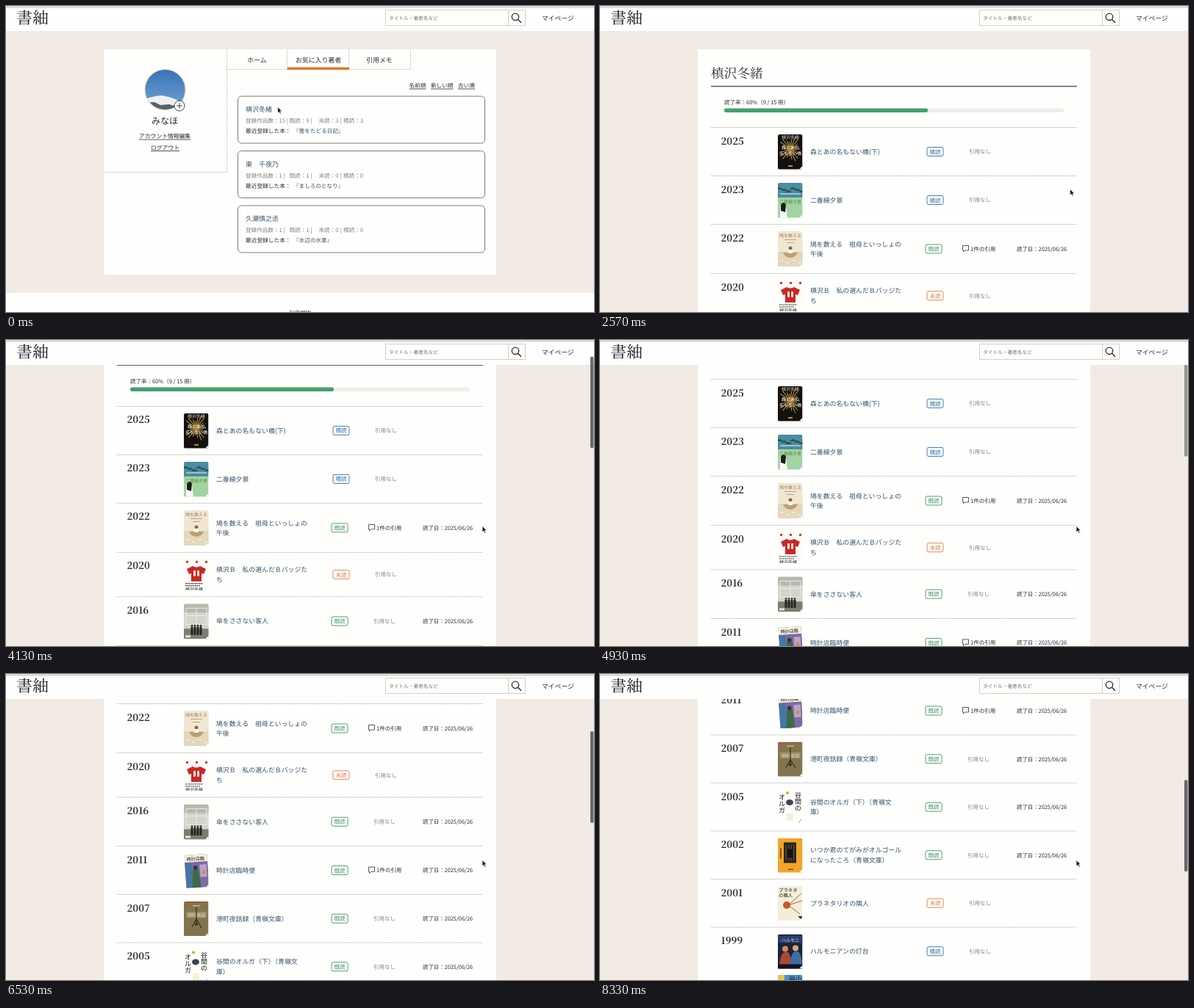
An HTML page for the animation above (8.36 s loop, 800 by 417 pixels).

```html
<!DOCTYPE html>
<html lang="ja">
<head>
<meta charset="utf-8">
<title>読書記録</title>
<style>
  html, body { margin: 0; width: 100%; height: 100%; overflow: hidden; background: #f1ebe3; }
  svg { display: block; width: 100vw; height: 100vh; }
  text { font-family: 'Noto Sans CJK JP', 'Noto Sans CJK', 'Noto Sans', sans-serif; text-rendering: geometricPrecision; white-space: pre; }
  .serif { font-family: 'Noto Serif CJK JP', 'Noto Serif', 'Noto Sans CJK JP', serif; }
  .bold { font-weight: 500; }
  .heavy { font-weight: 600; }
  .mid { text-anchor: middle; }
</style>
</head>
<body>
<svg id="stage" viewBox="0 0 800 417"></svg>
<script>
const LOOP = 8360, PAGE_SWITCH = 1240;
const BACKDROP = '#f1ebe3', PAPER = '#fefefd', INK = '#2c2c2e', SLATE = '#34556a', MUTED = '#84827f', BORDER = '#d8cfc2';
const AUTHOR = '槙沢冬緒';

const text = (x, y, size, str, fill = INK, cls = '') =>
  `<text x="${x}" y="${y}" font-size="${size}" fill="${fill}" class="${cls}">${str}</text>`;
const rect = (x, y, w, h, fill, more = '') =>
  `<rect x="${x}" y="${y}" width="${w}" height="${h}" fill="${fill}" ${more}/>`;
const path = (d, stroke, width = 1, more = 'fill="none"') =>
  `<path d="${d}" stroke="${stroke}" stroke-width="${width}" ${more}/>`;
const shape = (d, fill) => `<path d="${d}" fill="${fill}"/>`;
const ball = (x, y, r, fill, more = '') => `<circle cx="${x}" cy="${y}" r="${r}" fill="${fill}" ${more}/>`;
const range = (n, fn) => Array.from({ length: n }, (_, i) => fn(i)).join('');
const link = (x, y, w, size, str) => text(x, y, size, str) + path(`M${x} ${y + 2}h${w}`, INK, .8);

// Book covers, drawn in a 34 x 48 box
const figures = (y, n, colour) => range(n, i =>
  ball(11 + i * 4, y, 1.3, colour) + rect(9.5 + i * 4, y + 1.5, 3, 11, colour));
const column = (x, y, size, str, fill = '#151515') =>
  [...str].map((c, i) => text(x, y + i * size, size, c, fill, 'bold')).join('');

const covers = {
  burst: () => rect(0, 0, 34, 48, '#12110f') +
    range(22, i => {
      const a = i * Math.PI / 11, r = 13 + 4 * Math.sin(i * 5);
      return path(`M17 20L${17 + r * Math.cos(a)} ${20 + r * 1.1 * Math.sin(a)}`, '#b08a3e', 1.1);
    }) +
    text(17, 6, 6, AUTHOR, '#dcd6c8', 'mid') + text(17, 20, 6, '森とあの', '#ffffff', 'mid bold') +
    text(17, 28, 6, '名もない橋', '#ffffff', 'mid bold') + rect(14, 42, 6, 2, '#b08a3e'),
  garden: () => rect(0, 0, 34, 48, '#a3d3a0') + rect(0, 0, 34, 20, '#4a8ca0') +
    range(6, i => shape(`M${i * 6 - 2} ${9 + i % 3 * 2}q5 -6 9 0z`, '#2b5358')) +
    rect(3, 14, 28, 2, '#9bc4c4') + text(17, 28, 6, '二番線夕景', '#5b8a4c', 'mid') +
    shape('M3 48V32Q6 25 11 31L13 48z', '#fbfaf6') + shape('M4 38V30Q8 24 11 30L10 40z', '#1b1d1c'),
  boat: () => rect(0, 0, 34, 48, '#efe7d2') + rect(0, 28, 34, 20, '#e3d7bc') +
    text(17, 8, 6, '鳩を数える', '#a1835a', 'mid') + rect(9, 11, 16, 1, '#bba37c') + rect(12, 15, 10, 1, '#bba37c') +
    shape('M7 29h20q-3 7-10 7t-10-7z', '#bf9f6c') + ball(17, 23, 2.5, '#8a6747') + rect(14, 25, 6, 5, '#faf6ea') +
    range(4, i => path(`M${3 + i * 8} ${40 + i % 2 * 3}h5`, '#faf6ea')),
  shirt: () => rect(0, 0, 34, 48, '#fdfcfa') +
    range(3, i => rect(3 + i * 13, 2, 3, 3, '#d23a30')) +
    shape('M12 9q5 3 10 0l8 4-3 7-3-1v11H10V19l-3 1-3-7z', '#c62a28') +
    rect(13, 15, 3, 8, '#f6dcd0', 'rx="1"') + rect(18, 15, 3, 8, '#f6dcd0', 'rx="1"') +
    range(2, i => path(`M2 ${33 + i * 3}h${24 - i * 4}`, '#38383a', 1.2, 'stroke-dasharray="2 .6"')) +
    text(2, 43, 6, AUTHOR, '#262628'),
  bar: () => rect(0, 0, 34, 48, '#d3d4ca') + rect(0, 0, 34, 12, '#b8b9ae') +
    rect(3, 6, 28, 22, 'none', 'stroke="#f3f3ec" stroke-width=".8"') + path('M17 6V28M3 16H31', '#f3f3ec', .8) +
    rect(0, 34, 34, 14, '#7c7c70') + figures(30, 4, '#262624') + rect(2, 43, 7, 3, '#e7e5d8'),
  clockshop: () => `<g transform="rotate(-4 17 24)">` + rect(2, 2, 31, 45, '#7d6aa4') + rect(2, 2, 31, 10, '#f3efe0') +
    text(17, 10, 6, '時計店臨', '#171716', 'mid bold') + rect(2, 13, 9, 34, '#4576a8') + rect(22, 16, 9, 17, '#b9a4cc') +
    shape('M10 47L12 24Q16 16 20 24L22 47z', '#3c6b45') + ball(16, 20, 3, '#2f3b2c') + rect(25, 24, 4, 5, '#df8440') + '</g>',
  tower: () => rect(0, 0, 34, 48, '#82754e') + rect(0, 0, 34, 1.5, '#b4482a') +
    rect(3, 14, 28, 8, '#9b906c') + text(17, 21, 6, '港町夜話', '#ded6bb', 'mid') +
    rect(12, 5, 10, 1.5, '#c4b991') + path('M17 8V32M17 24L11 35M17 24L24 36', '#3b3322', 1.3) + ball(17, 31, 2, '#3b3322'),
  valley: () => rect(0, 0, 34, 48, '#fefefc') + column(23, 10, 9, '谷間の') + column(1, 13, 9, 'オルガ') +
    `<ellipse cx="16" cy="17" rx="5" ry="4" fill="#3d444e"/>` + ball(13, 4, 2, '#e09a3b') +
    rect(12, 32, 9, 10, '#f6f0d6') + path('M28 45l4-5', '#a9a280'),
  amber: () => rect(0, 0, 34, 48, '#f2a52c') + rect(8, 6, 17, 28, '#292318') +
    range(4, i => path(`M${11 + i * 3.6} 9V31`, '#6c6245', .9)) + rect(13, 15, 7, 12, '#151411') +
    rect(3, 14, 2, 14, '#7d5218') + rect(14, 42, 7, 1.5, '#7d5218'),
  planet: () => rect(0, 0, 34, 48, '#f4eed8') + text(1, 8, 6.4, 'プラネタ', '#171716', 'bold') +
    text(1, 15, 6.4, 'の隣人', '#171716', 'bold') + path('M14 26L32 10M14 26L33 20M14 26L30 38', '#a8522c', .9) +
    ball(12, 26, 5, '#c9572c') + shape('M27 41h6v6z', '#3c3a32'),
  lighthouse: () => rect(0, 0, 34, 48, '#1c2437') + rect(0, 2, 34, 10, '#283d6b') +
    text(17, 10, 6, 'ハルモニ', '#f1eee4', 'mid bold') + ball(10, 20, 4, '#cf8b5a') + shape('M2 42Q4 24 11 24T18 42z', '#a84a30') +
    ball(24, 19, 4, '#d6a878') + shape('M16 42Q18 23 25 23T33 42z', '#3e6da5') + rect(0, 41, 34, 7, '#111422'),
  harbour: () => rect(0, 0, 34, 48, '#4d8fc8') + column(15, 9, 9, '谷間') + column(24, 9, 9, '小舟') + rect(0, 0, 9, 20, '#e8c554')
};

const states = { 積読: ['#2f72b0', 445, 502], 既読: ['#3f9460', 443, 500], 未読: ['#e07d42', 445, 502] };

// [year, title lines, state, cover, row height, has a quote]
const books = [
  [2025, ['森とあの名もない橋(下)'], '積読', 'burst', 66],
  [2023, ['二番線夕景'], '積読', 'garden', 66],
  [2022, ['鳩を数える　祖母といっしょの', '午後'], '既読', 'boat', 67, true],
  [2020, ['槙沢Ｂ　私の選んだＢバッジた', 'ち'], '未読', 'shirt', 60.5],
  [2016, ['傘をささない客人'], '既読', 'bar', 66.5],
  [2011, ['時計店臨時便'], '既読', 'clockshop', 66, true],
  [2007, ['港町夜話録（青嶺文庫）'], '既読', 'tower', 65.5],
  [2005, ['谷間のオルガ（下）（青嶺文', '庫）'], '既読', 'valley', 65.5],
  [2002, ['いつか君のてがみがオルゴール', 'になったころ（青嶺文庫）'], '既読', 'amber', 65.5],
  [2001, ['プラネタリオの隣人'], '未読', 'planet', 65.5],
  [1999, ['ハルモニアンの灯台'], '積読', 'lighthouse', 65.5]
];

const cover = (name, y, h) =>
  `<svg x="242" y="${y}" width="33.5" height="${h}" viewBox="0 0 33.5 ${h}"><g clip-path="url(#round${h < 45 ? 'Short' : ''})">` +
  covers[name]() + '</g>' + shape(`M34 ${h - 5}L29 ${h}H34z`, PAPER) + '</svg>';

function bookRow([year, lines, state, art, height, quoted], top) {
  const mid = top + height / 2, [colour, badgeX, noteX] = states[state];
  const first = mid + 3.3 - (lines.length - 1) * 6.6;
  let out = path(`M151 ${top}H649`, '#aaa9ab', 1, 'stroke-dasharray="1 1"') +
    text(164.5, top + 23, 13.2, year, INK, 'serif heavy') +
    cover(art, top + 9.5, height - 18.5) +
    lines.map((line, i) => text(286, first + i * 13.2, 8.9, line, SLATE)).join('') +
    rect(badgeX, mid - 6, 22, 12, 'none', `rx="2" stroke="${colour}" stroke-width=".9"`) +
    text(badgeX + 11, mid + 3, 7.6, state, colour, 'mid bold');
  out += quoted
    ? path(`M493.5 ${mid - 4.5}h8v6.5h-5l-2 2v-2h-1z`, INK, .8) + text(504, mid + 2.8, 7.5, '1件の引用')
    : text(noteX, mid + 2.8, 7.5, '引用なし', MUTED);
  if (state === '既読') out += text(567, mid + 2.8, 7.4, '読了日：2025/06/26');
  return out;
}

function authorPage() {
  let top = 165.5;
  const rows = books.map(book => {
    const row = bookRow(book, top);
    top += book[4];
    return row;
  }).join('');
  return rect(133, 59, 534, 1300, PAPER) +
    text(151, 98, 17.7, AUTHOR, INK, 'serif') + path('M151 109.5H649', '#58585a', 1.4) +
    text(169, 134.3, 7.5, '読了率：60%（9 / 15 冊）') +
    rect(169, 139.5, 462, 5.5, '#f0eeeb', 'rx="2.7"') + rect(169, 139.5, 277, 5.5, '#46a06c', 'rx="2.7"') +
    rows + cover('harbour', top - .5, 47);
}

function card(y, name, counts, book) {
  const labels = ['登録作品数', '既読', '未読', '積読'], xs = [326, 385.5, 425.5, 459];
  return rect(315.5, y, 336, 64, PAPER, 'rx="5" stroke="#6b6b6c" stroke-width=".9"') +
    text(326, y + 21, 9, name, SLATE) +
    labels.map((label, i) => text(xs[i], y + 36, 7.6, `${label}：${counts[i]}${i < 3 ? ' |' : ''}`, MUTED)).join('') +
    text(326, y + 50, 7.7, '最近登録した本：', INK, 'bold') + text(391, y + 50, 7.6, `『${book}』`, SLATE, 'bold');
}

function listPage() {
  return rect(133, 59, 534, 307, PAPER) + rect(0, 391, 800, 26, '#fefefe') +
    path('M300.5 59V226.5H133M300 86.5H550.5V59M382.5 59V86M466.5 59V86', '#bdb6ac', 1, 'fill="none" stroke-dasharray="1 1"') +
    rect(383, 83.5, 84, 3.3, '#e0751f') +
    text(341.5, 77, 8.9, 'ホーム', INK, 'mid bold') + text(425, 77, 8.9, 'お気に入り著者', INK, 'mid bold') +
    text(508, 77, 8.9, '引用メモ', INK, 'mid bold') +
    `<g clip-path="url(#avatar)">` + rect(188, 86, 58, 58, 'url(#sky)') +
    shape('M186 128Q202 122 212 122Q228 124 246 135V145H186z', '#eef0f2') +
    shape('M186 132l16-1 8 4 12-1 24 7v6H186z', '#56626a') + '</g>' +
    ball(216.5, 114, 27.5, 'none', `stroke="${BORDER}"`) +
    ball(236, 136, 7, PAPER, `stroke="${INK}" stroke-width=".9"`) + path('M232 136h8M236 132v8', INK, .9) +
    text(216, 161, 12.2, 'みなほ', INK, 'mid bold') +
    link(181, 180, 70, 7.8, 'アカウント情報編集') + link(197, 195.5, 39, 7.8, 'ログアウト') +
    link(548.5, 111, 23, 7.6, '名前順') + link(578, 111, 30.5, 7.6, '新しい順') + link(615, 111, 23, 7.6, '古い順') +
    card(123, AUTHOR, [15, 9, 3, 3], '雲をたどる日記') +
    card(197.5, '東　千夜乃', [1, 1, 0, 0], 'ましろのとなり') +
    card(272, '久瀬慎之丞', [1, 1, 0, 0], '水辺の水車') +
    text(400, 421, 7.5, '利用規約', INK, 'mid');
}

const header = rect(0, 0, 800, 34, '#fefefe') + rect(0, 0, 800, 3, '#dfdcd9') +
  text(14, 24, 22, '書紬', '#1c1c1e', 'serif') +
  rect(516.5, 5.5, 190, 21, PAPER, `stroke="${BORDER}"`) + path('M683.5 5.5v21', BORDER) +
  text(521, 18.7, 6.7, 'タイトル・著者名など', '#757473') +
  ball(693, 14.8, 4.7, 'none', `stroke="${INK}" stroke-width="1.3"`) + path('M696.5 18.3l4.5 4.5', INK, 1.5) +
  text(729, 19.5, 8.8, 'マイページ', INK, 'bold');

document.getElementById('stage').innerHTML = `<defs>
  <clipPath id="avatar"><circle cx="216.5" cy="114" r="27.5"/></clipPath>
  <clipPath id="round"><rect width="33.5" height="48" rx="2.5"/></clipPath>
  <clipPath id="roundShort"><rect width="33.5" height="42" rx="2.5"/></clipPath>
  <linearGradient id="sky" x2="0" y2="1"><stop stop-color="#3a72b8"/><stop offset="1" stop-color="#74a6d2"/></linearGradient>
  </defs>` + rect(0, 0, 800, 417, BACKDROP) +
  `<g id="list">${listPage()}</g><g id="author">${authorPage()}</g>${header}` +
  rect(795, 0, 4.5, 125, '#3c3c40', 'id="thumb" rx="2.2"') +
  `<path id="cursor" d="M0 0V8.5L2 6.8L3.4 9.8L4.8 9.1L3.5 6.2H6.2z" fill="#1c1c1e" stroke="#fff" stroke-width=".7"/>`;

const [list, author, thumb, cursor] = ['list', 'author', 'thumb', 'cursor'].map(id => document.getElementById(id));

// Eased value between [time, value] knots
function track(t, knots) {
  const i = knots.findIndex(k => t < k[0]);
  if (i === 0) return knots[0][1];
  if (i < 0) return knots[knots.length - 1][1];
  const [t0, a] = knots[i - 1], [t1, b] = knots[i], u = (t - t0) / (t1 - t0);
  return a + (b - a) * u * u * (3 - 2 * u);
}

const scrollKnots = [[3540, 0], [4500, 112], [5100, 112], [5750, 244], [6350, 244], [7150, 343.5], [7500, 343.5], [8310, 474.5]];
const thumbKnots = [[3460, 0], [3580, .75], [4560, .75], [4930, .5], [5130, .75], [7150, .75], [7470, .5], [7600, .75]];
const cursorX = [[1400, 369.5], [2300, 639.5], [2900, 639.5], [3400, 648]];
const cursorY = [[1400, 137.5], [2300, 249.5], [2900, 249.5], [3400, 253.5]];

function draw(t) {
  const scroll = track(t, scrollKnots), onAuthor = t >= PAGE_SWITCH;
  list.setAttribute('display', onAuthor ? 'none' : 'inline');
  author.setAttribute('display', onAuthor ? 'inline' : 'none');
  author.setAttribute('transform', `translate(0 ${-scroll})`);
  thumb.setAttribute('y', scroll * .305 - .5);
  thumb.setAttribute('opacity', track(t, thumbKnots));
  cursor.setAttribute('transform', `translate(${track(t, cursorX)} ${track(t, cursorY)})`);
}

const start = performance.now();
function tick() {
  draw((performance.now() - start) % LOOP);
  requestAnimationFrame(tick);
}
tick();
</script>
</body>
</html>
```
